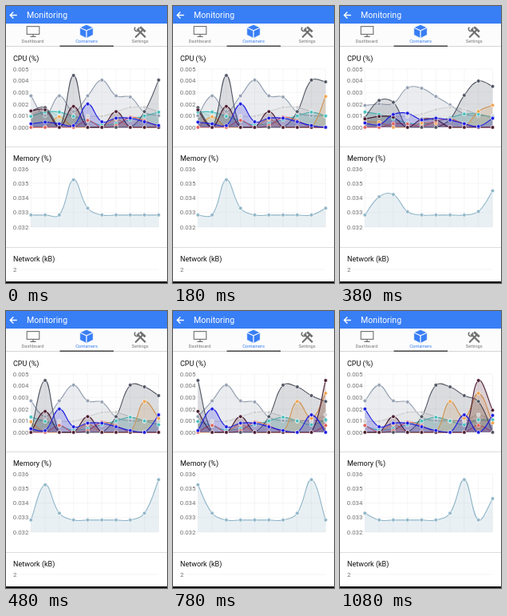
Animation, 202 px wide and 347 px high, one loop 1200 ms. Source, as an HTML page:

```html
<!DOCTYPE html>
<html lang="en">
<head>
<meta charset="utf-8">
<title>Monitoring</title>
<style>
  html, body { margin: 0; width: 100%; height: 100%; overflow: hidden; background: #fff; }
  svg { display: block; width: 202px; height: 347px; font-family: Roboto, "Noto Sans", sans-serif; }
  .tab { font-size: 5.75px; fill: #777; text-anchor: middle; }
  .head { font-size: 9px; fill: #111; }
  .tick { font-size: 7.8px; fill: #707070; text-anchor: end; }
  .grid { stroke: #000; stroke-opacity: .06; stroke-width: .7; fill: none; }
</style>
</head>
<body>
<svg viewBox="0 0 202 347">
  <rect width="202" height="347" fill="#fff"/>
  <rect width="202" height="22" fill="#387ef5"/>
  <path d="M13.8 11.5H5.6M9.3 7.4L5.2 11.5L9.3 15.6" fill="none" stroke="#fff" stroke-width="1.4"/>
  <text x="26" y="15.2" font-size="10.6" fill="#fff">Monitoring</text>

  <rect y="22" width="202" height="28" fill="#fcfcfc"/>
  <path d="M0 50.5H202" stroke="#ccc" stroke-width=".8"/>
  <path d="M67.5 50.2H135" stroke="#444" stroke-width="1.4"/>

  <g transform="translate(0 -1)">
    <g fill="none" stroke="#707070">
      <rect x="26.2" y="26.6" width="15.6" height="9.8" stroke-width="1.1"/>
      <path d="M34 36.5V39M30.5 39.3H37.5" stroke-width="1.2"/>
    </g>
    <g stroke="#fff" stroke-width=".7" stroke-linejoin="round" fill="#387ef5">
      <path d="M101 24.3L109.3 27.9L101 31.6L92.7 27.9Z"/>
      <path d="M92.7 28.3L100.8 32V41.3L92.7 37.2Z"/>
      <path d="M109.3 28.3L101.2 32V41.3L109.3 37.2Z"/>
    </g>
    <g fill="none" stroke="#707070">
      <path d="M165 30.5L174.4 39.6" stroke-width="2.2" stroke-linecap="round"/>
      <path d="M162.4 27.7A2.7 2.7 0 1 0 166 28" stroke-width="1.6"/>
      <path d="M162.8 39.8L171 31.4" stroke-width="2.1" stroke-linecap="round"/>
      <path d="M168.2 27.2L174.8 33.2" stroke-width="2.8"/>
    </g>
    <text class="tab" x="33.5" y="46.8">Dashboard</text>
    <text class="tab" x="101" y="46.8" style="fill:#387ef5">Containers</text>
    <text class="tab" x="168.3" y="46.8">Settings</text>
  </g>

  <text class="head" x="9" y="69">CPU (%)</text>
  <text class="head" x="9" y="194">Memory (%)</text>
  <text class="head" x="9" y="320">Network (kB)</text>
  <path d="M0 176.5H202M0 302.5H202" stroke="#ddd"/>
  <text class="tick" x="13.5" y="332.5">2</text>
  <path class="grid" d="M16 330H191.5"/>

  <g id="charts"></g>
  <rect y="345" width="202" height="2" fill="#111"/>
</svg>
<script>
const NS = "http://www.w3.org/2000/svg";
const LOOP = 1200, EASE = 120, TICK = 20;
const COUNT = 10, LEFT = 31.3, STEP = 17.8;
const xAt = i => LEFT + STEP * i;

// Values are thousandths above `low`. Each line idles at `rest` and rises
// in tents of [sample, height, half width]; listed back to front.
const charts = [
  { top: 79, base: 152, low: 0, high: 5, lines: [
    { color: "#949fb1", rest: 1, tents: [[0, 2.7], [2, 2.7], [5, 4.05, 3], [7, 2.6, 2]] },
    { color: "#d0d0d0", rest: .95, tents: [[1, 1.5, 2], [7.5, 1.9, 5], [12, 1.5]] },
    { color: "#46bfbd", rest: .05, tents: [[1.5, 1.5, 4], [9, 1.3, 4], [12.5, 1.3, 3]] },
    { color: "#f0a54f", rest: 0, tents: [[2, .9], [6, .7], [10, 2.65], [11, 1.2], [12, 3.35], [13, .8]] },
    { color: "#e0605c", rest: 0, tents: [[4, .6], [7.3, 1.1, 1.5], [12, .6]] },
    { color: "#4d5360", rest: 0, tents: [[0, 1.4], [1, 1.7], [3, 4.45], [9, 4.05, 1.5], [10, 3.9], [11, 3.15], [12, 2.65]] },
    { color: "#4a1a30", rest: 0, tents: [[0, 1.4], [1, 1.5], [3, 1.8], [6, 1.35], [12, 4.45], [13, 1.9]] },
    { color: "#1a1ae0", rest: 0, tents: [[1, .45, 3], [4, 2], [6.5, .95, 3], [11, 1.5], [13, 1.45]] }
  ] },
  { top: 204, base: 277, low: 32, high: 36, lines: [
    { color: "#8fb5c7", rest: .83, tents: [[3, 3.25], [4, 1.3], [10, 1.3], [11, 3.6], [13, 2.3]] }
  ] }
];

// When each new sample arrives, and how far its easing has run by then.
const updates = [[20, 20], [360, 0], [680, 80], [980, 0]];

const valueAt = ({ rest, tents }, i) => Math.max(rest,
  ...tents.map(([at, height, half = 1]) => height * (1 - Math.abs(i - at) / half)));

function add(parent, tag, attrs, text) {
  const node = document.createElementNS(NS, tag);
  for (const key in attrs) node.setAttribute(key, attrs[key]);
  if (text) node.textContent = text;
  return parent.appendChild(node);
}

function build(chart) {
  const root = add(document.getElementById("charts"), "g", {});
  chart.unit = (chart.base - chart.top) / (chart.high - chart.low);
  for (let v = chart.low; v <= chart.high; v++) {
    const y = chart.base - chart.unit * (v - chart.low);
    add(root, "text", { class: "tick", x: 28.4, y: y + 2.7 }, (v / 1000).toFixed(3));
    add(root, "path", { class: "grid", d: `M${LEFT} ${y}H${xAt(COUNT - 1)}` });
  }
  for (let i = 0; i < COUNT; i++)
    add(root, "path", { class: "grid", d: `M${xAt(i)} ${chart.top}V${chart.base}` });

  const area = add(root, "g", {}), points = add(root, "g", {});
  for (const line of chart.lines) {
    line.fill = add(area, "path", { fill: line.color, "fill-opacity": .2 });
    line.stroke = add(area, "path", { fill: "none", stroke: line.color, "stroke-width": 1.1 });
    line.dots = Array.from({ length: COUNT }, (_, i) => add(points, "circle",
      { cx: xAt(i), r: 2.3, fill: line.color, stroke: "#fff", "stroke-width": .6 }));
  }
}

// Cubic spline with tension 0.4, handles kept inside the plot.
function curve(ys, top, base) {
  const clamp = y => Math.min(base, Math.max(top, y));
  const handles = ys.map((y, i) => {
    const a = Math.max(0, i - 1), b = Math.min(COUNT - 1, i + 1);
    const d1 = Math.hypot(STEP, y - ys[a]), d2 = Math.hypot(STEP, ys[b] - y);
    const k1 = .4 * d1 / (d1 + d2), k2 = .4 * d2 / (d1 + d2);
    const dx = STEP * (b - a), dy = ys[b] - ys[a];
    return [xAt(i) - k1 * dx, clamp(y - k1 * dy), xAt(i) + k2 * dx, clamp(y + k2 * dy)];
  });
  let d = `M${xAt(0)} ${ys[0]}`;
  for (let i = 1; i < COUNT; i++) {
    const p = handles[i - 1], q = handles[i];
    d += `C${p[2]} ${p[3]} ${q[0]} ${q[1]} ${xAt(i)} ${ys[i]}`;
  }
  return d;
}

function draw(chart, shift) {
  const from = Math.floor(shift), part = shift - from;
  for (const line of chart.lines) {
    const ys = line.dots.map((_, i) => {
      const now = valueAt(line, from + i), next = valueAt(line, from + i + 1);
      return chart.base - chart.unit * (now + (next - now) * part);
    });
    const d = curve(ys, chart.top, chart.base);
    line.stroke.setAttribute("d", d);
    line.fill.setAttribute("d", `${d}V${chart.base}H${LEFT}Z`);
    line.dots.forEach((dot, i) => dot.setAttribute("cy", ys[i]));
  }
}

// Samples scrolled past: one quartic ease-out per update.
function shiftAt(t) {
  return updates.reduce((sum, [at, age]) => {
    if (t < at) return sum;
    const u = Math.min(1, (t - at + age) / EASE);
    return sum + 1 - (1 - u) ** 4;
  }, 0);
}

charts.forEach(build);

const start = performance.now();
let shown = -1;
function frame() {
  const t = Math.max(0, performance.now() - start) % LOOP;
  const shift = shiftAt(Math.floor(t / TICK) * TICK);
  if (shift !== shown) {
    charts.forEach(chart => draw(chart, shift));
    shown = shift;
  }
  requestAnimationFrame(frame);
}
frame();
</script>
</body>
</html>
```
